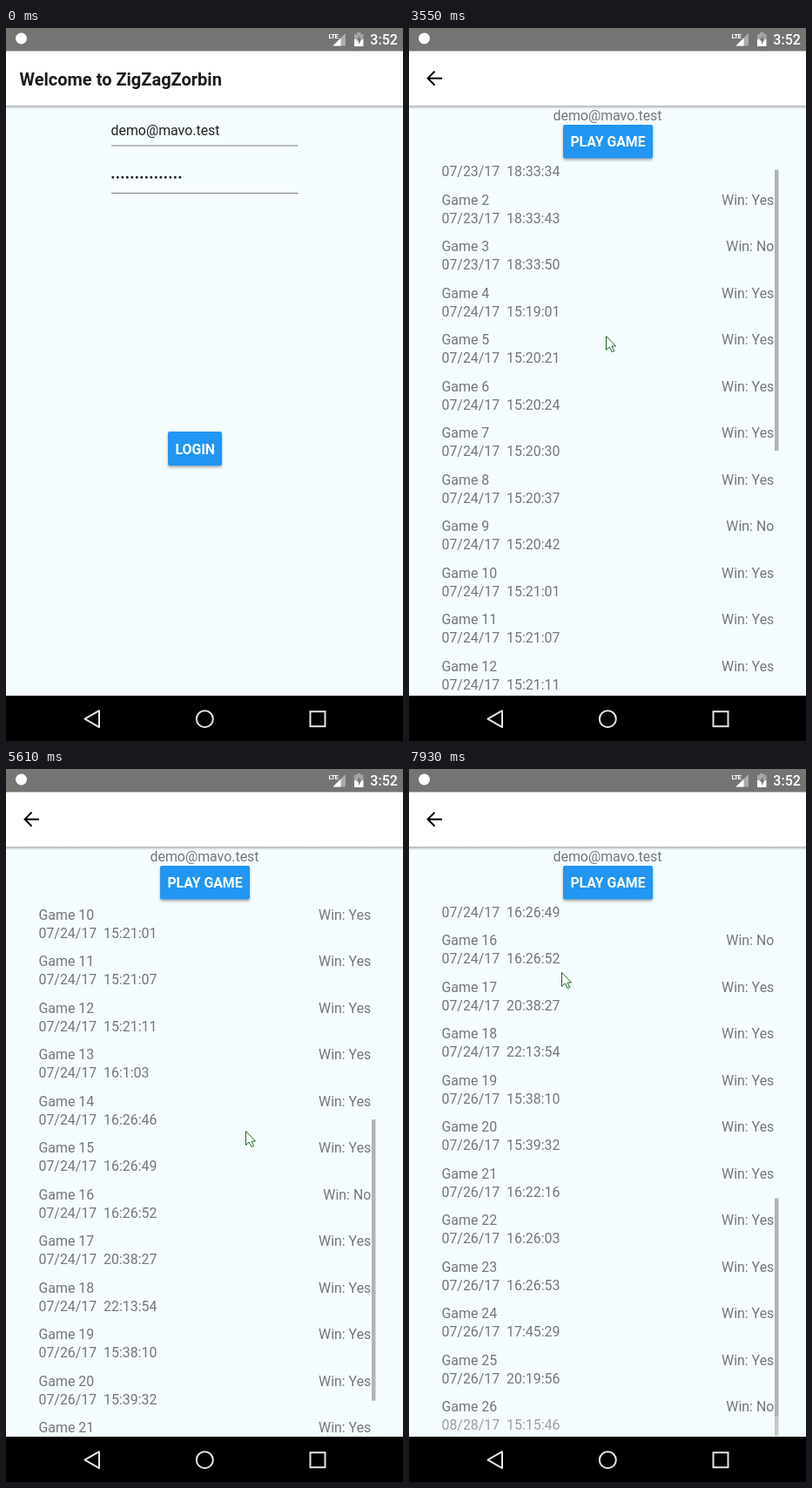
An HTML page for the animation above (8 s loop, 456 by 818 pixels).

```html
<!DOCTYPE html>
<html lang="en">
<head>
<meta charset="utf-8">
<title>Game history</title>
<style>
  html, body { margin: 0; width: 100%; height: 100%; overflow: hidden; background: #f5fcff; }
  svg { display: block; width: 456px; height: 818px; font-family: Roboto, "Open Sans", sans-serif; font-size: 15.9px; }
  .bold { font-weight: 700; }
  .button rect { fill: #2196f3; filter: drop-shadow(0 2px 1.5px rgba(0, 0, 0, .32)); }
  .button text { fill: #fff; font-weight: 700; font-size: 15.8px; text-anchor: middle; }
  .grey { fill: #747678; }
  .end { text-anchor: end; }
</style>
</head>
<body>
<svg viewBox="0 0 456 818">
  <defs>
    <clipPath id="bodyClip"><rect y="89" width="456" height="677"/></clipPath>
    <clipPath id="listClip"><rect y="150" width="456" height="616"/></clipPath>
    <linearGradient id="shade" x2="0" y2="1">
      <stop stop-color="#000" stop-opacity=".3"/>
      <stop offset="1" stop-color="#000" stop-opacity="0"/>
    </linearGradient>
  </defs>
  <rect width="456" height="818" fill="#f5fcff"/>

  <g clip-path="url(#bodyClip)">
    <g id="login">
      <text x="120.500" y="122.500" fill="#222">demo@mavo.test</text>
      <path d="M121 135H335.500M121 189.500H335.500" stroke="#777b7d"/>
      <path d="M122.800 171.300H202" stroke="#222" stroke-width="3" stroke-linecap="round" stroke-dasharray="0 5.500"/>
      <g class="button">
        <rect id="loginButton" x="186" y="463" width="62" height="39" rx="2"/>
        <text x="217.300" y="488.500">LOGIN</text>
      </g>
    </g>
    <g id="history">
      <rect y="89" width="456" height="740" fill="#f5fcff"/>
      <text class="grey" x="228" y="106" text-anchor="middle">demo@mavo.test</text>
      <g class="button">
        <rect x="177" y="111" width="103" height="38.500" rx="2"/>
        <text x="228.500" y="136.300">PLAY GAME</text>
      </g>
      <g clip-path="url(#listClip)">
        <g id="rows" class="grey"></g>
        <rect id="scrollbar" x="420" width="4.500" fill="#b0b3b5"/>
        <rect id="edge" y="743" width="456" height="23" fill="#f5fcff" opacity=".3"/>
      </g>
    </g>
    <rect y="765" width="456" height="1" fill="#fff"/>
  </g>

  <rect y="26" width="456" height="63" fill="#fff"/>
  <rect y="89" width="456" height="4" fill="url(#shade)"/>
  <text id="title" class="bold" x="15.500" y="66" font-size="20" fill="#1b1b1d">Welcome to ZigZagZorbin</text>
  <path id="back" d="M38 57.700H22M29.500 49.800L21.600 57.700L29.500 65.600" fill="none" stroke="#000" stroke-width="2"/>

  <rect width="456" height="26.500" fill="#737573"/>
  <circle cx="17.500" cy="12" r="6.500" fill="#fff"/>
  <text class="bold" x="370.500" y="12" font-size="8" fill="#fff" letter-spacing="-.8">LTE</text>
  <path d="M390 6V20.500H375.500Z" fill="#fff" opacity=".4"/>
  <path d="M384.500 11.500V20.500H375.500Z" fill="#fff"/>
  <path d="M400 7H403V5H407.500V7H410.500V13H400Z" fill="#fff" opacity=".35"/>
  <path d="M400 13H410.500V21H400Z" fill="#fff"/>
  <path d="M406.500 8.500L402.500 14.500H405V19L408.500 12.800H406.500Z" fill="#737573"/>
  <text x="418.300" y="18.800" font-size="16" font-weight="500" fill="#fff">3:52</text>

  <rect y="766" width="456" height="52" fill="#000"/>
  <g fill="none" stroke="#e4e4e4" stroke-width="2">
    <path d="M90.500 792.700L107 783.200V802.200Z" stroke-linejoin="round"/>
    <circle cx="228.300" cy="792.700" r="9.500"/>
    <rect x="349.500" y="784.200" width="17" height="17"/>
  </g>

  <path id="cursor" d="M.5 .5V16.500L4.300 13L7 18.600L9.600 17.500L7 12H11.500Z" fill="#fff"/>
</svg>
<script>
const LOOP = 8000, PITCH = 53.5, VIEW = 616, TOP = 150;
const LOGIN = 1070, OPEN = 1990, SCROLL = 3480;
const $ = id => document.getElementById(id);
const set = (id, attrs) => Object.entries(attrs).forEach(([k, v]) => $(id).setAttribute(k, v));
const progress = (t, from, to) => Math.max(0, Math.min(1, (t - from) / (to - from)));
const easeOut = (p, power) => 1 - (1 - p) ** power;
const smooth = p => p * p * (3 - 2 * p);

const history = {
  "07/23/17": "18:33:34 18:33:43 18:33:50",
  "07/24/17": "15:19:01 15:20:21 15:20:24 15:20:30 15:20:37 15:20:42 15:21:01 15:21:07 " +
    "15:21:11 16:1:03 16:26:46 16:26:49 16:26:52 20:38:27 22:13:54",
  "07/26/17": "15:38:10 15:39:32 16:22:16 16:26:03 16:26:53 17:45:29 20:19:56",
  "08/28/17": "15:15:46"
};
const losses = [3, 9, 16, 26];
const games = Object.entries(history).flatMap(([day, times]) =>
  times.split(" ").map(time => `${day}\u00a0\u00a0${time}`));

$("rows").innerHTML = games.map((played, i) => {
  const n = i + 1, y = 173 + i * PITCH;
  return `<g><text x="37.500" y="${y}">Game ${n}</text>
    <text x="37.500" y="${y + 21.2}">${played}</text>
    <text class="end" x="419.300" y="${y}">Win: ${losses.includes(n) ? "No" : "Yes"}</text></g>`;
}).join("");
const rows = [...$("rows").children];

// Each move glides on from where the last one ended
const moves = [
  { from: 70, to: 850, x: 230, y: 488 },
  { from: 1110, to: 1390, x: 288, y: 592 },
  { from: 2020, to: 2670, x: 247, y: 473 },
  { from: 2830, to: 3240, x: 226, y: 353 },
  { from: 3930, to: 4570, x: 226, y: 630 },
  { from: 4570, to: 5610, x: 275, y: 415 },
  { from: 5690, to: 6890, x: 218, y: 368 },
  { from: 6890, to: 7930, x: 175, y: 233 }
];

function pointerAt(t) {
  return moves.reduce((at, move) => {
    const p = smooth(progress(t, move.from, move.to));
    return { x: at.x + (move.x - at.x) * p, y: at.y + (move.y - at.y) * p };
  }, { x: 349, y: 775 });
}

// A nudge, a long fling and a slow last pull
const scrollAt = t =>
  24 * progress(t, 3440, 3550) +
  666 * easeOut(progress(t, 4533, 6330), 1.27) +
  83.5 * easeOut(progress(t, 6450, 7930), 1.72);

function render(t) {
  const shown = easeOut(progress(t, OPEN, OPEN + 500), 4);
  set("title", { opacity: 1 - shown });
  set("back", { opacity: shown });
  set("history", { opacity: shown, transform: `translate(0 ${50 * (1 - shown)})` });
  $("loginButton").style.fill = t < LOGIN ? "#2196f3" : "#1f8ae3";

  // The list grows in batches, which resizes the scrollbar
  const count = t < SCROLL ? 12 : t < 6100 ? 22 : games.length;
  const offset = scrollAt(t), ratio = VIEW / (count * PITCH);
  rows.forEach((row, i) => row.setAttribute("visibility", i < count ? "inherit" : "hidden"));
  set("rows", { transform: `translate(0 ${-offset})` });
  set("scrollbar", { y: TOP + offset * ratio, height: VIEW * ratio });
  set("edge", { visibility: t > 7500 ? "inherit" : "hidden" });

  const { x, y } = pointerAt(t);
  set("cursor", {
    visibility: t < moves[0].from ? "hidden" : "visible",
    transform: `translate(${Math.round(x)} ${Math.round(y)})`,
    stroke: t < SCROLL ? "#111" : "#1a6622"
  });
}

const start = performance.now();
function tick() {
  render((performance.now() - start) % LOOP);
  requestAnimationFrame(tick);
}
tick();
</script>
</body>
</html>
```
